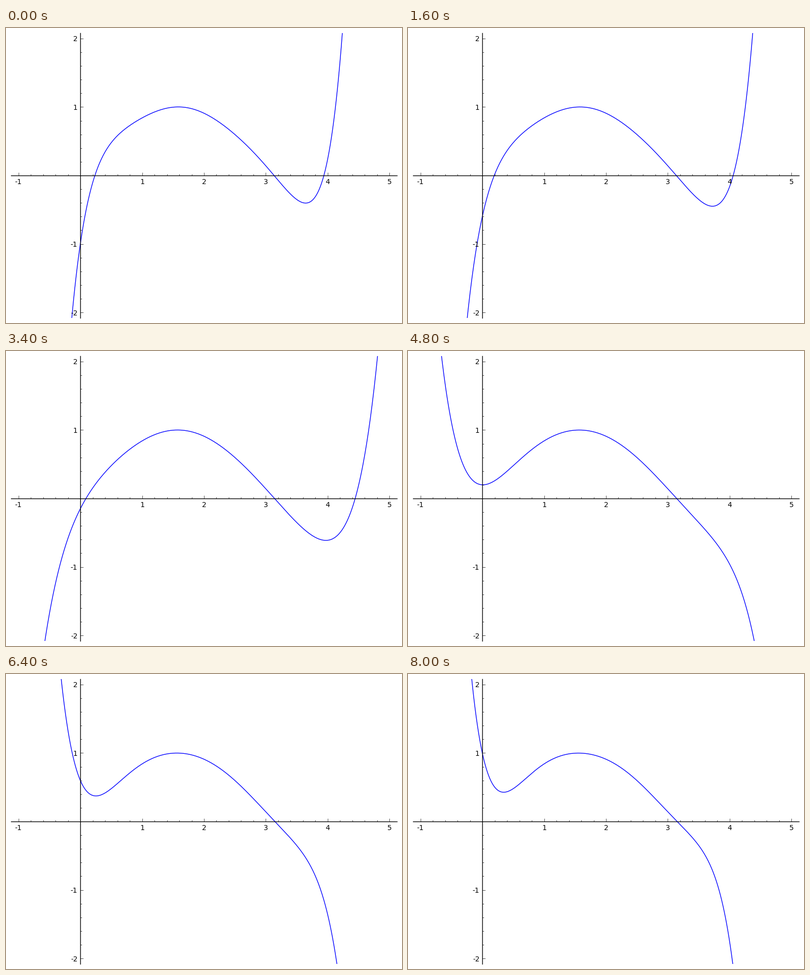
Write a matplotlib script that moves like this. It is 784 px wide and 584 px high and loops after 8.2 s.

```python
import numpy as np
import matplotlib.pyplot as plt
from matplotlib.animation import FuncAnimation

W, H, DPI = 784, 584, 100
MARGIN = 10
FRAMES, INTERVAL = 41, 200

plt.rcParams["font.family"] = "DejaVu Sans"

# Degree-7 polynomial through (0, a) and seven samples of the sine.
nodes = np.arange(0, 4, 0.5)
x = np.linspace(-1, 5, 601)


def basis(i):
    """Lagrange basis polynomial of node i, evaluated on x."""
    others = np.delete(nodes, i)
    return np.prod([(x - n) / (nodes[i] - n) for n in others], axis=0)


sine_part = sum(np.sin(n) * basis(i) for i, n in enumerate(nodes))
free_part = basis(0)


def setup_axis(axis, lo, hi):
    major = np.arange(lo, hi + 1)
    axis.set_ticks(major, labels=[str(v) if v else "" for v in major])
    axis.set_ticks(np.arange(5 * lo, 5 * hi + 1) / 5, minor=True)


fig = plt.figure(figsize=(W / DPI, H / DPI), dpi=DPI, facecolor="white")
ax = fig.add_axes([MARGIN / W, MARGIN / H, 1 - 2 * MARGIN / W, 1 - 2 * MARGIN / H])

for side in ("top", "right"):
    ax.spines[side].set_visible(False)
for side in ("left", "bottom"):
    ax.spines[side].set_position("zero")
    ax.spines[side].set_linewidth(1)

setup_axis(ax.xaxis, -1, 5)
setup_axis(ax.yaxis, -2, 2)
ax.tick_params(which="major", direction="in", length=4, width=0.5, pad=4, labelsize=10)
ax.tick_params(which="minor", direction="in", length=2, width=0.5)
ax.set_axisbelow(False)
ax.set_xlim(-1.12, 5.12)
ax.set_ylim(-2.08, 2.08)

curve, = ax.plot(x, sine_part, color="#0000ff", lw=1)


def update(k):
    a = -1 + 2 * k / (FRAMES - 1)
    curve.set_ydata(sine_part + a * free_part)
    return curve,


anim = FuncAnimation(fig, update, frames=FRAMES, interval=INTERVAL,
                     repeat=True, repeat_delay=0)
plt.show()
```
